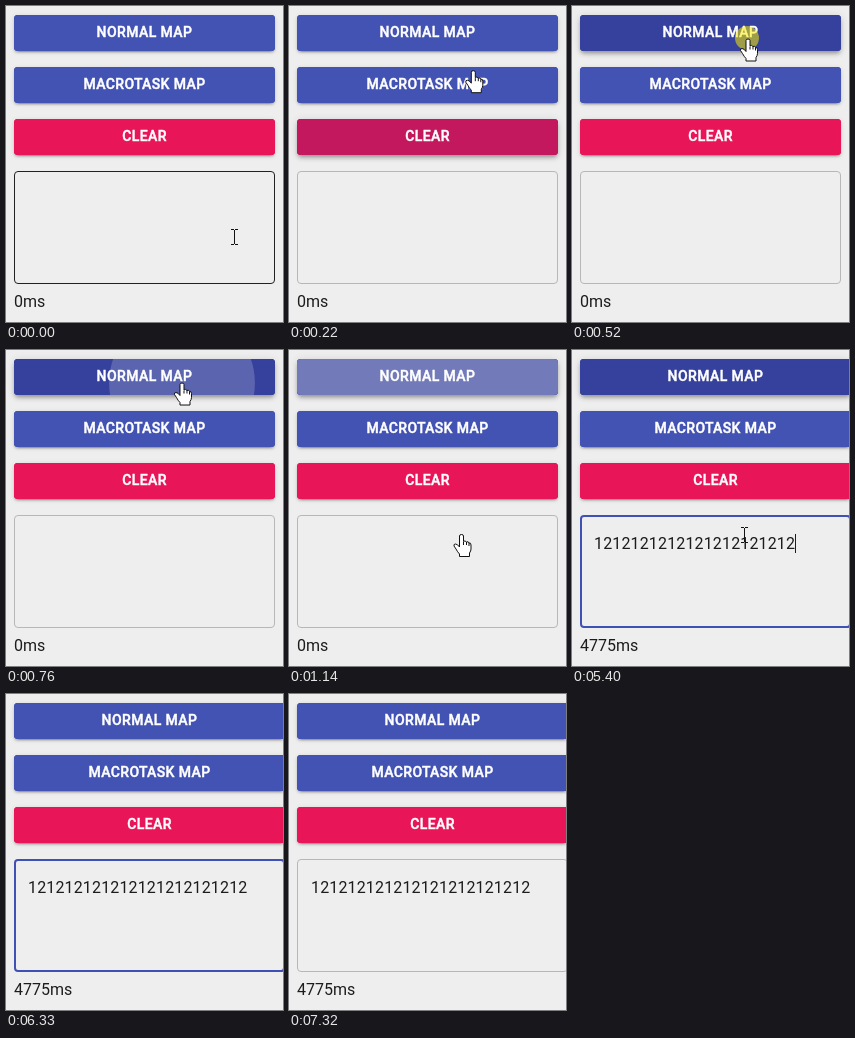
Animation of 277 by 316 pixels, one loop 7400 ms. Source, as an HTML page with a canvas:

```html
<!DOCTYPE html>
<html lang="en">
<head>
<meta charset="utf-8">
<style>
html, body { margin: 0; width: 277px; height: 316px; overflow: hidden; background: #eee; }
canvas { display: block; }
</style>
</head>
<body>
<canvas id="stage" width="277" height="316"></canvas>
<script>
const ctx = document.getElementById('stage').getContext('2d');
const LOOP = 7400, STEP = 76.25, LEAD = 15;
const CLICK = 520, THAW = 5400, BLUR = 7320;
const BLUE = [67, 83, 179], BLUE_DARK = [53, 65, 156];
const PINK = [233, 21, 89], PINK_DARK = [195, 24, 93];
const INK = '#1c1c1c';

const ramp = (t, from, to) => Math.min(1, Math.max(0, (t - from) / (to - from)));
const easeOut = f => 1 - (1 - f) ** 3;
const smooth = f => f * f * (3 - 2 * f);
const lerp = (a, b, f) => a + (b - a) * f;
const mix = (a, b, f) => `rgb(${a.map((v, i) => Math.round(lerp(v, b[i], f)))})`;

function box(x, y, w, h, r) {
  ctx.beginPath();
  ctx.roundRect(x, y, w, h, r);
}

function disc(x, y, r, color) {
  ctx.fillStyle = color;
  ctx.beginPath();
  ctx.arc(x, y, r, 0, 7);
  ctx.fill();
}

function text(str, x, y, font, color, spacing = 0, align = 'left') {
  ctx.font = font + ' Roboto, sans-serif';
  ctx.letterSpacing = spacing + 'px';
  ctx.textAlign = align;
  ctx.fillStyle = color;
  ctx.fillText(str, x, y);
}

function shadow(x, y, w, h, dy, blur, inset, alpha) {
  ctx.save();
  ctx.shadowColor = `rgba(0,0,0,${alpha})`;
  ctx.shadowOffsetY = dy;
  ctx.shadowBlur = blur;
  box(x + inset, y + inset, w - 2 * inset, h - 2 * inset, 4);
  ctx.fill();
  ctx.restore();
}

function button(label, y, w, color, lift) {
  ctx.fillStyle = color;
  shadow(8, y, w, 36, 3, 1 + 3 * lift, 2 - lift, .2);
  shadow(8, y, w, 36, 2 + 2 * lift, 2 + 3 * lift, 0, .14);
  shadow(8, y, w, 36, 1, 5 + 5 * lift, 0, .12);
  box(8, y, w, 36, 4);
  ctx.fill();
  // A hairline outline gives the label its heavier weight.
  text(label, 8 + w / 2, y + 22, '500 14px', '#fff', .4, 'center');
  ctx.strokeStyle = '#fff';
  ctx.lineWidth = .45;
  ctx.strokeText(label, 8 + w / 2, y + 22);
}

function ripple(t) {
  const f = ramp(t, CLICK, 1060);
  ctx.save();
  box(8, 9, 261, 36, 4);
  ctx.clip();
  disc(176, 33, 172 * smooth(f), `rgba(255,255,255,${lerp(.1, .3, f)})`);
  ctx.restore();
}

function field(t, w) {
  const focused = t >= THAW && t < BLUR;
  const line = focused ? 2 : 1;
  ctx.lineWidth = line;
  ctx.strokeStyle = focused ? '#3f51b5' : t < STEP ? '#212121' : '#b7b7b7';
  box(8 + line / 2, 165 + line / 2, w - line, 113 - line, 4 - line / 2);
  ctx.stroke();
  if (t < THAW) return;
  const count = Math.min(24, 22 + Math.floor((t - THAW) / STEP));
  text('12'.repeat(12).slice(0, count), 22, 199, '16px', INK, .15);
  const blink = t - 5670;
  if (focused && (blink < 0 || blink % 1040 < 450)) {
    ctx.fillRect(Math.floor(22 + ctx.measureText('1').width * count), 184, 1, 19);
  }
}

const hand = new Path2D('M-2 13V2Q-2 .5 0 .5T2 2V7.5Q3.5 6 5 8Q7 7 7.5 9Q9.5 8.5 9.5 11' +
  'V15Q9.5 17 8 19V22.5H-2V20Q-4 18-5.5 15L-7.5 12Q-8 10-6 10Q-4 10-2 13Z');
const knuckles = new Path2D('M2 8V11M5 8V11M7.5 9V12');
const beam = new Path2D('M-3 -7.5H0M1 -7.5H4M.5 -7V7M-3 7.5H0M1 7.5H4');

function pointer(t) {
  if (t < 700) {
    const f = easeOut(ramp(t, 0, 500));
    return [lerp(228, 176, f), lerp(231, 32.5, f)];
  }
  if (t < THAW) {
    const f = smooth(ramp(t, 760, 1140));
    return [lerp(176, 172.5, f), lerp(32.5, 184, f)];
  }
  const f = easeOut(ramp(t, 5780, 6330));
  return [lerp(172, 243, f), lerp(185, 326, f)];
}

function cursor(t) {
  ctx.save();
  ctx.translate(...pointer(t));
  ctx.strokeStyle = '#111';
  ctx.lineWidth = 1;
  if (t < STEP || t >= THAW) {
    ctx.stroke(beam);
  } else {
    ctx.fillStyle = '#fff';
    ctx.fill(hand);
    ctx.stroke(hand);
    ctx.stroke(knuckles);
  }
  ctx.restore();
}

function draw(now) {
  const t = Math.floor((now % LOOP + LEAD) / STEP) * STEP;
  const w = t < THAW ? 261 : 271;
  const normal = ramp(t, 230, 450) - ramp(t, 5420, 5710);
  const clear = ramp(t, 0, 220) - ramp(t, 230, 450);

  ctx.fillStyle = '#eee';
  ctx.fillRect(0, 0, 277, 316);
  button('NORMAL MAP', 9, w, mix(BLUE, BLUE_DARK, normal), normal * .8);
  if (t > CLICK && t < THAW) ripple(t);
  button('MACROTASK MAP', 61, w, mix(BLUE, BLUE_DARK, 0), 0);
  button('CLEAR', 113, w, mix(PINK, PINK_DARK, clear), clear * .7);
  field(t, w);
  text(t < THAW ? '0ms' : '4775ms', 8, 301, '16px', INK);
  if (t > CLICK && t < 650) disc(175, 32, 12, 'rgba(255,240,0,.53)');
  if (t < 6330 - LEAD) cursor(t);
}

const start = performance.now();
function tick() {
  draw(performance.now() - start);
  requestAnimationFrame(tick);
}
tick();
</script>
</body>
</html>
```
